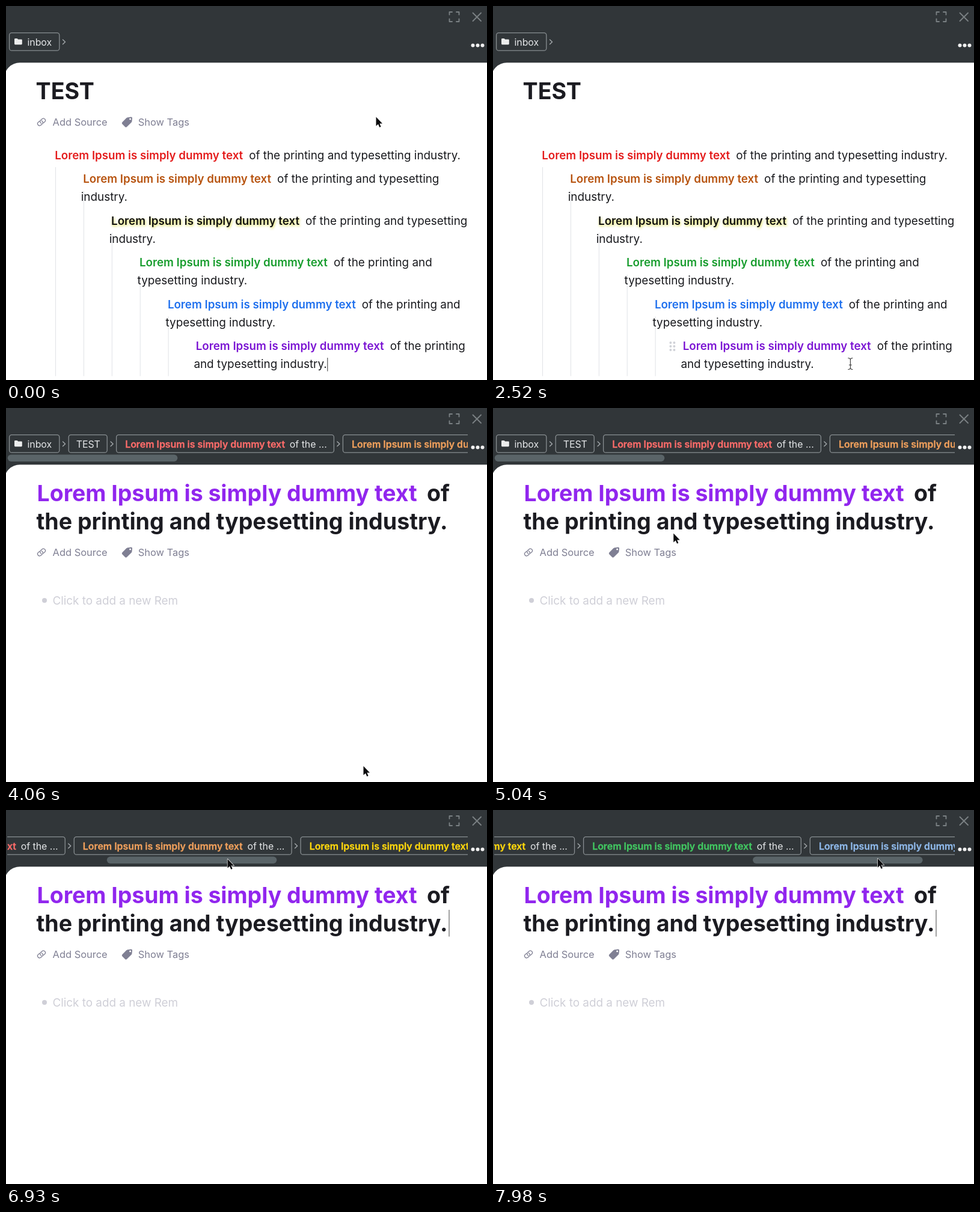
Recreate the animation shown at these times as an HTML page. Size 800 px wide and 622 px high, loop 8000 ms.

```html
<!DOCTYPE html>
<html lang="en">
<head>
<meta charset="utf-8">
<title>Nested notes</title>
<style>
  html, body { margin: 0; width: 100%; height: 100%; overflow: hidden; background: #fff; }
  svg { display: block; width: 100vw; height: 100vh; }
  text { font-family: Inter, sans-serif; font-optical-sizing: none; white-space: pre; }
  .body { font-size: 18.88px; fill: #18191d; }
  .strong { font-size: 18.72px; font-weight: 600; }
  .title { font-size: 37.6px; font-weight: 700; fill: #1b1b21; }
  .lead { font-size: 37.4px; font-weight: 700; fill: #9126ee; }
  .meta { font-size: 16.45px; fill: #7f7f93; }
  .crumb { font-size: 15.9px; fill: #e4e6e8; }
  .mark { font-size: 15.9px; font-weight: 600; stroke-width: .3; }
  .hint { font-size: 18.88px; fill: #cfcfd7; }
  .glow { filter: drop-shadow(1.5px 2px 2px #dcdc4c); }
  .box { fill: none; stroke: #888e91; stroke-width: 1.3; }
  .line { fill: none; stroke-linecap: round; stroke-linejoin: round; }
</style>
</head>
<body>
<svg id="stage" viewBox="0 0 800 622" xmlns="http://www.w3.org/2000/svg"></svg>
<script>
const LOOP = 8000, STEP = 70;
const ZOOM_AT = 2990, DRAG_AT = 6220;
const SCROLL_RATIO = 2.71, CRUMB_PITCH = 376.8;
const PHRASE = 'Lorem Ipsum is simply dummy text';

// Pointer: time, x, y
const POINTER = [
  [0, 615, 184], [700, 615, 184], [1900, 595, 595], [2990, 594, 595],
  [4300, 594, 595], [5400, 201, 78], [DRAG_AT, 201, 78],
  [6930, 368, 81], [7490, 500, 82], [LOOP, 645, 80]
];
// Scrollbar thumb: time, offset
const THUMB = [[0, 0], [DRAG_AT, 0], [6930, 165], [7490, 290], [LOOP, 435]];

const ROWS = [
  ['#e41c1c', 'of the printing and typesetting industry.', ''],
  ['#b7530f', 'of the printing and typesetting', 'industry.'],
  ['#111111', 'of the printing and typesetting', 'industry.'],
  ['#189d2e', 'of the printing and', 'typesetting industry.'],
  ['#1f70ee', 'of the printing and', 'typesetting industry.'],
  ['#7b14d3', 'of the printing', 'and typesetting industry.']
];
const CRUMBS = ['#fc6c6a', '#f0a05c', '#ffd80c', '#42c962', '#8fb9ea'];

const text = (cls, x, y, str, extra = '') =>
  `<text class="${cls}" x="${x}" y="${y}" ${extra}>${str}</text>`;
const path = (d, color, width) =>
  `<path class="line" d="${d}" stroke="${color}" stroke-width="${width}"/>`;
const dot = (x, y, r, color) => `<circle cx="${x}" cy="${y}" r="${r}" fill="${color}"/>`;
const box = (x, w) => `<rect class="box" x="${x}" y="44.6" width="${w}" height="29.6" rx="4"/>`;
const chevron = x => path(`M${x - 2} 56l4 3.7l-4 3.7`, '#a4a9ac', 1.4);

const rowBase = i => 77.9 + 46.9 * i;
const rowY = i => i ? 294 + 69.6 * (i - 1) : 254.5;

function row([color, first, second], i) {
  const x = rowBase(i), y = rowY(i);
  const guide = i < 5
    ? `<path d="M${x + 4.6} ${y + 13.5}V615.5" stroke="#e0e2e6" stroke-width="1"/>` : '';
  return guide +
    text('strong' + (i === 2 ? ' glow' : ''), x + 3.4, y, PHRASE, `fill="${color}"`) +
    text('body', x + 326.3, y, first) +
    (second && text('body', x, y + 30, second));
}

function crumb(color, i) {
  const x = 183.6 + CRUMB_PITCH * i;
  return chevron(x - 7.5) + box(x, 361.8) +
    text('mark', x + 14.6, 65.8, PHRASE, `fill="${color}" stroke="${color}"`) +
    text('crumb', x + 288.2, 65.8, 'of the ...');
}

const meta = `
  <g transform="translate(59 193) rotate(-40)">
    ${path('M-1.5 -3.2H-4.2a3.2 3.2 0 0 0 0 6.4H-1.2a3.2 3.2 0 0 0 2.8 -4.6', '#7f7f93', 1.3)}
    ${path('M1.5 3.2H4.2a3.2 3.2 0 0 0 0 -6.4H1.2a3.2 3.2 0 0 0 -2.8 4.6', '#7f7f93', 1.3)}
  </g>
  <path fill="#7f7f93" fill-rule="evenodd" d="M201.5 185.4L208 184.4Q210 184.4 210 186.5L209.4 192
    Q209.2 193 208.4 193.8L201 201Q199.4 202.4 198 201L193.3 196.2Q192 194.8 193.4 193.2L200 186.4Z
    M206.6 186.6a1.5 1.5 0 1 0 .01 0Z"/>
  ${text('meta', 77.6, 199, 'Add Source')}
  ${text('meta', 219.7, 199, 'Show Tags')}`;

const handle = [0, 6].map(x => [-6, 0, 6].map(y => dot(x, y, 2, '#d0d2d8')).join('')).join('');

document.getElementById('stage').innerHTML = `
  <clipPath id="strip"><rect x="2" y="40" width="766" height="40"/></clipPath>
  <rect width="800" height="622" fill="#313639"/>
  <path d="M-3 622V120.3A26 26 0 0 1 23 94.3H800V622Z" fill="#fff"/>
  ${path('M737.5 14.5V10H742M749 10H753.5V14.5M753.5 21.5V26H749M742 26H737.5V21.5', '#7a8083', 1.9)}
  ${path('M776.5 11.5L790 25M790 11.5L776.5 25', '#7a8083', 1.9)}
  ${[776.5, 784.5, 792.5].map(x => dot(x, 65.4, 3, '#f0f0f0')).join('')}
  <g clip-path="url(#strip)"><g id="crumbs">
    ${box(5.6, 83.2)}
    <path d="M14 55.2Q14 54 15.2 54H18.6L20.2 55.6H25.6Q26.8 55.6 26.8 56.8V62.8Q26.8 64.2 25.6 64.2H15.2Q14 64.2 14 62.8Z" fill="#eceded"/>
    ${text('crumb', 35.4, 65.8, 'inbox')}
    ${chevron(96.5)}
    <g id="trail">
      ${box(104.2, 64)}
      ${text('crumb', 116.7, 65.8, 'TEST')}
      ${CRUMBS.map(crumb).join('')}
    </g>
  </g></g>
  <rect id="thumb" y="77.5" width="282.5" height="11.5" rx="5.75" fill="#5a6468"/>
  <g id="list">
    ${text('title', 49.6, 155, 'TEST')}
    <g id="listMeta">${meta}</g>
    ${ROWS.map(row).join('')}
    <g id="handle">${handle}</g>
    <path id="listCaret" d="M534.8 585V607.5" stroke="#333" stroke-width="1"/>
  </g>
  <g id="detail">
    ${text('lead', 51.6, 155, PHRASE)}
    ${text('title', 700, 155, 'of')}
    ${text('title', 50.4, 202, 'the printing and typesetting industry.')}
    <g transform="translate(0 47)">${meta}</g>
    ${dot(64, 320, 4, '#cfcfd7')}
    ${text('hint', 77.4, 326.5, 'Click to add a new Rem')}
    <path id="titleCaret" d="M737 166V210.5" stroke="#444" stroke-width="1"/>
  </g>
  <path id="arrow" d="M.5 .5V15.6L4 12.4L6.3 17.7L8.6 16.7L6.4 11.5H11Z" fill="#0c0c0e"
    stroke="#fff" stroke-width="1.3" stroke-linejoin="round" paint-order="stroke"/>
  <g id="beam">${path('M-3.6 -9.5Q-1 -9.5 0 -7.5Q1 -9.5 3.6 -9.5M0 -7.5V7.5M-3.6 9.5Q-1 9.5 0 7.5Q1 9.5 3.6 9.5M-2 2H2', '#333', 1.1)}</g>`;

const el = id => document.getElementById(id);
const show = (id, on) => el(id).setAttribute('display', on ? 'inline' : 'none');
const move = (id, x, y) => el(id).setAttribute('transform', `translate(${x} ${y})`);

function track(keys, t) {
  let i = 1;
  while (i < keys.length - 1 && t >= keys[i][0]) i++;
  const a = keys[i - 1], b = keys[i];
  let k = (t - a[0]) / (b[0] - a[0]);
  if (t < DRAG_AT) k = k * k * (3 - 2 * k);
  return a.slice(1).map((v, j) => v + (b[j + 1] - v) * k);
}

function draw(t) {
  const [x, y] = track(POINTER, t);
  const [thumb] = track(THUMB, t);
  const zoomed = t >= ZOOM_AT;
  const overRows = !zoomed && y > 228;

  show('list', !zoomed);
  show('detail', zoomed);
  show('trail', zoomed);
  show('thumb', zoomed);
  show('listMeta', !overRows);
  show('listCaret', t % 1000 < 500);
  show('titleCaret', t >= 6500 || t % 1000 >= 500);
  show('handle', overRows);
  show('beam', overRows);
  show('arrow', !overRows);

  if (overRows) {
    let i = ROWS.length - 1;
    while (i > 0 && y < rowY(i) - 26) i--;
    move('handle', rowBase(i) - 17, rowY(i) - 6.4);
  }
  move('crumbs', -thumb * SCROLL_RATIO, 0);
  el('thumb').setAttribute('x', 2.8 + thumb);
  move('beam', x, y);
  move('arrow', x, y);
}

const start = performance.now();
function tick() {
  const t = (performance.now() - start) % LOOP;
  draw(Math.floor(t / STEP) * STEP);
  requestAnimationFrame(tick);
}
tick();
</script>
</body>
</html>
```
